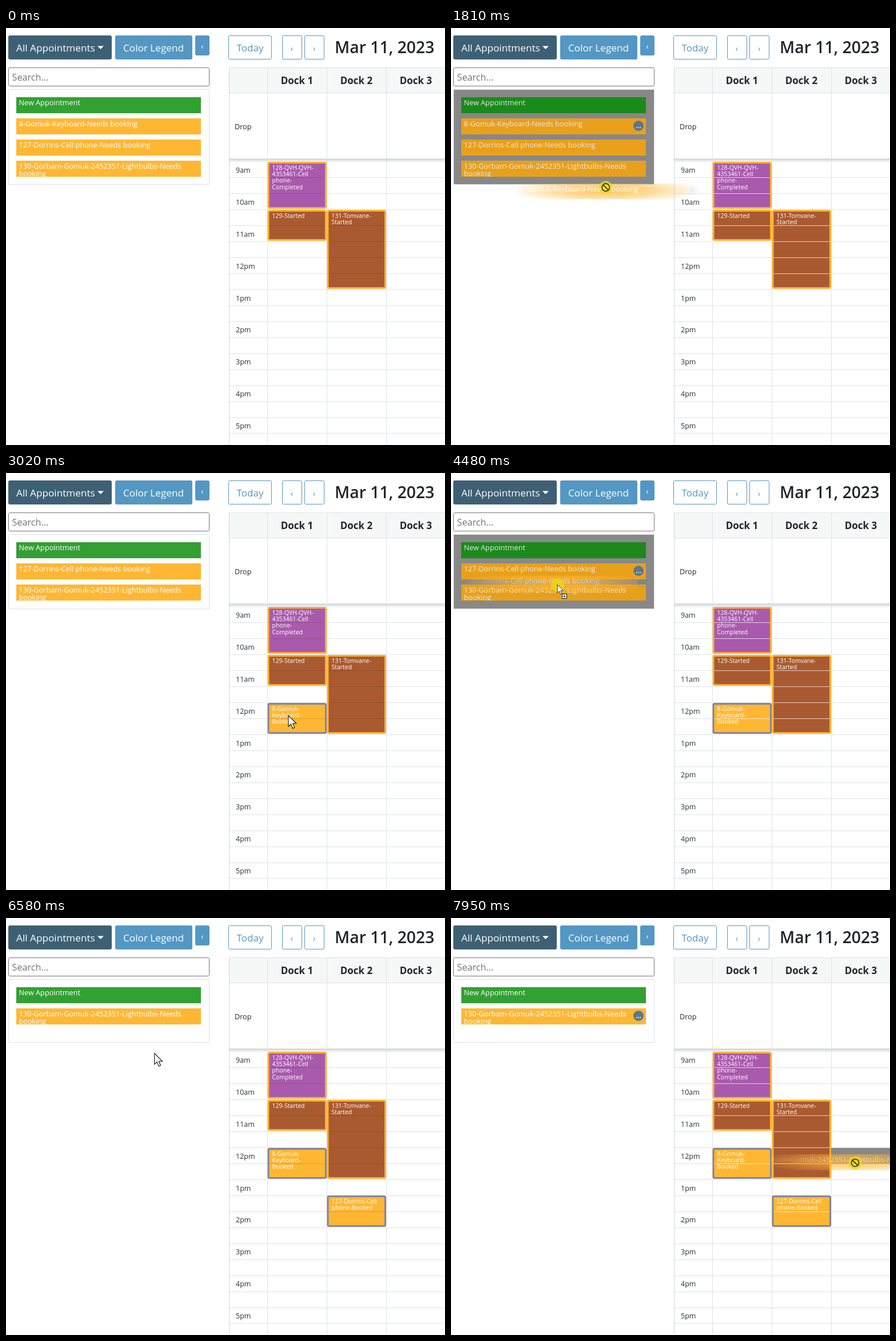
These frames come from a looping animation (768 px wide and 729 px high, 8000 ms). An HTML page with a canvas:

```html
<!DOCTYPE html>
<html lang="en">
<head>
<meta charset="utf-8">
<title>Dock schedule</title>
<style>
html, body { margin: 0; height: 100%; overflow: hidden; background: #fff; }
canvas { display: block; width: 100vw; height: 100vh; }
</style>
</head>
<body>
<canvas id="stage" width="768" height="729"></canvas>
<script>
const LOOP = 8000, COL = 104;
const BLUE = '#5497c3', ORANGE = '#ffb733', LINE = '#dee2e6', INK = '#212529';
const main = document.getElementById('stage').getContext('2d');
const layer = document.createElement('canvas');
layer.width = 768;
layer.height = 729;
const ghost = layer.getContext('2d');
let g = main;

// Pointer path: time, x, y
const path = [
  [300, 695, 701], [1070, 198, 194], [1270, 173, 169], [1510, 173, 169],
  [2200, 454, 440], [2470, 494, 424], [3390, 494, 424], [4160, 181, 176],
  [4210, 179, 174], [4400, 179, 174], [4480, 186, 195], [5090, 589, 514],
  [5410, 603, 508], [6110, 603, 508], [6580, 260, 237], [6880, 214, 173],
  [7000, 214, 173], [7450, 560, 478], [7700, 698, 448], [7950, 707, 428]
];

// Drag: pointer down, start, release, settled, grab point
const drags = [
  { down: 1440, start: 1520, drop: 2700, done: 2970, x: 173, y: 165 },
  { down: 4360, start: 4420, drop: 5560, done: 5560, x: 179, y: 174 },
  { down: 6930, start: 7010, drop: 9000, done: 9000, x: 214, y: 173 }
];

const items = [
  { lines: ['8-Gomuk-Keyboard-Needs booking'], until: 2970 },
  { lines: ['127-Dorrins-Cell phone-Needs booking'], until: 5560 },
  { lines: ['130-Gorbam-Gomuk-2452351-Lightbulbs-Needs', 'booking'], until: 9000 }
];

// Events span half-hour rows
const events = [
  { col: 0, row: 0, rows: 3, fill: '#a95aad', lines: ['128-QVH-QVH-', '4353461-Cell', 'phone-', 'Completed'] },
  { col: 0, row: 3, rows: 2, fill: '#aa5a30', lines: ['129-Started'] },
  { col: 1, row: 3, rows: 5, fill: '#aa5a30', lines: ['131-Tomvane-', 'Started'] },
  { col: 0, row: 6, rows: 2, fill: ORANGE, lines: ['8-Gomuk-', 'Keyboard-', 'Booked'], from: 2700, booked: 2970 },
  { col: 1, row: 9, rows: 2, fill: ORANGE, lines: ['127-Dorrins-Cell', 'phone-Booked'], from: 5560, booked: 5910 }
];

const rowTop = i => 234 + 27.94 * i;

function slope(i, k) {
  const a = path[i - 1], b = path[i], c = path[i + 1];
  if (!a || !c) return 0;
  const p = (b[k] - a[k]) / (b[0] - a[0]), q = (c[k] - b[k]) / (c[0] - b[0]);
  return p * q > 0 ? 2 * p * q / (p + q) : 0;
}

function pointer(t) {
  let i = 0;
  while (i < path.length - 2 && path[i + 1][0] <= t) i++;
  const a = path[i], b = path[i + 1], d = b[0] - a[0];
  const u = Math.max(0, Math.min(1, (t - a[0]) / d)), v = 1 - u;
  const at = k => a[k] * v * v * (1 + 2 * u) + b[k] * u * u * (3 - 2 * u)
    + d * u * v * (v * slope(i, k) - u * slope(i + 1, k));
  return { x: at(1), y: at(2) };
}

function rect(x, y, w, h, fill) {
  g.fillStyle = fill;
  g.fillRect(x, y, w, h);
}

function box(x, y, w, h, r, fill, stroke, width = 1) {
  g.beginPath();
  g.roundRect(x, y, w, h, r);
  if (fill) { g.fillStyle = fill; g.fill(); }
  if (stroke) { g.strokeStyle = stroke; g.lineWidth = width; g.stroke(); }
}

function text(s, x, y, size, color, weight = 400, align = 'left') {
  g.font = `${weight} ${size}px "Open Sans", "Noto Sans", sans-serif`;
  g.fillStyle = color;
  g.textAlign = align;
  g.fillText(s, x, y);
}

function disc(x, y, r, fill) {
  g.beginPath();
  g.arc(x, y, r, 0, 7);
  g.fillStyle = fill;
  g.fill();
}

function item(lines, x, y, fill, color, badge) {
  g.save();
  g.beginPath();
  g.rect(x, y, 323, 28);
  g.clip();
  rect(x, y, 323, 28, fill);
  lines.forEach((s, i) => text(s, x + 4.5, y + 14 + 13 * i, 12.7, color, 500));
  if (badge) {
    disc(x + 310, y + 13, 9, '#5f7786');
    for (let i = -1; i < 2; i++) disc(x + 310 + i * 3.2, y + 16, 1, color);
  }
  g.restore();
}

function toolbar() {
  box(4, 13, 181, 42, 3, '#3e6075');
  text('All Appointments', 18, 41, 17.2, '#fff');
  g.beginPath();
  g.moveTo(160, 31.5);
  g.lineTo(171, 31.5);
  g.lineTo(165.5, 37);
  g.fill();
  box(191, 13, 135, 42, 3, BLUE);
  text('Color Legend', 258, 41, 17.2, '#fff', 400, 'center');
  box(331, 13, 25, 35, 3, BLUE);
  text('‹', 343.5, 37, 14, '#fff', 400, 'center');
  box(389.5, 13.5, 75, 41, 2, '#fff', BLUE);
  text('Today', 427, 41, 17, BLUE, 400, 'center');
  box(483.5, 13.5, 34, 41, 2, '#fff', BLUE);
  text('‹', 500, 41, 15, BLUE, 400, 'center');
  box(522.5, 13.5, 34, 41, 2, '#fff', BLUE);
  text('›', 539, 41, 15, BLUE, 400, 'center');
  text('Mar 11, 2023', 575, 44, 28.4, INK, 600);
  box(4.5, 69.5, 351, 32, 2, '#fff', '#767676');
  text('Search...', 10.5, 92, 16.2, '#757575');
}

function list(t, p, held, dim) {
  const rows = items.filter(r => t < r.until);
  const height = Math.max(110, 56 + 36.8 * rows.length);
  const color = dim ? '#e8e8e8' : '#fff';
  box(4.5, 107.5, 351, Math.round(height), 0, dim ? '#888' : '#fff', LINE);
  item(['New Appointment'], 18, 121, dim ? '#1b8a1b' : '#33a033', color);
  rows.forEach((r, i) => {
    const y = Math.round(158 + 36.8 * i);
    const over = t >= 300 && p.x > 18 && p.x < 341 && p.y > y && p.y < y + 28;
    item(r.lines, 18, y, dim ? '#e8a01b' : ORANGE, color, held ? i === 0 : over);
  });
}

function calendar() {
  rect(390, 69, 378, 45, '#f6f8f8');
  rect(390, 69, 378, 1, LINE);
  rect(390, 113, 378, 1, LINE);
  rect(390, 228, 378, 4, '#dadedd');
  rect(390, 233, 378, 1, LINE);
  [1, 2, 3].forEach(n => text('Dock ' + n, 405 + COL * n, 98, 17, INK, 700, 'center'));
  text('Drop', 400, 177, 12.6, INK);
  for (let i = 1; i < 18; i++) rect(390, Math.floor(rowTop(i)), 378, 1, LINE);
  for (let i = 0; i < 9; i++) {
    const h = 9 + i;
    text((h > 12 ? h - 12 : h) + (h < 12 ? 'am' : 'pm'), 402, rowTop(2 * i) + 19, 12.5, '#2b2f33');
  }
  rect(390, 69, 1, 660, '#d3d7da');
  [457, 561, 665].forEach(x => rect(x, 69, 1, 660, LINE));
}

function event(e, t, held) {
  const x = 457.5 + COL * e.col, y = Math.round(rowTop(e.row));
  const h = Math.floor(rowTop(e.row + e.rows)) - 1 - y;
  const edge = t >= e.booked ? '#83849c' : '#ffb02c';
  box(x + 1.5, y + 1.5, 100.5, h - 3, 2, e.fill, edge, 3);
  for (let i = 1; i < e.rows; i++)
    rect(x + 3, Math.floor(rowTop(e.row + i)), 97.5, 1, held ? 'rgba(255,255,255,.7)' : 'rgba(60,40,30,.2)');
  e.lines.forEach((s, i) => text(s, x + 8, y + 14 + 11.2 * i, 10.5, '#fff', 500));
}

function slotAt(p) {
  if (p.x < 458 || p.y < rowTop(0)) return null;
  return { col: Math.floor((p.x - 457) / COL), row: Math.floor((p.y - rowTop(0)) / 27.94) };
}

// The carried item fades out around the pointer
function carry(lines, p, d) {
  const x = 18 + p.x - d.x, y = 158 + p.y - d.y;
  g = ghost;
  g.clearRect(0, 0, 768, 729);
  item(lines, x, y, ORANGE, '#fff', true);
  g.save();
  g.globalCompositeOperation = 'destination-in';
  g.translate(p.x, y + 12);
  g.scale(168, 23);
  const fade = g.createRadialGradient(0, 0, 0, 0, 0, 1);
  [[0, .8], [.5, .5], [.85, .16], [1, 0]].forEach(s => fade.addColorStop(s[0], `rgba(0,0,0,${s[1]})`));
  rect(-9, -99, 18, 198, fade);
  g.restore();
  g = main;
  g.drawImage(layer, 0, 0);
}

function arrow(p, scale) {
  const shape = [0, 0, 0, 19, 4.4, 15, 7.6, 22.4, 10.8, 21, 7.6, 13.8, 13.8, 13.8];
  g.save();
  g.translate(p.x, p.y);
  g.scale(scale, scale);
  g.beginPath();
  for (let i = 0; i < shape.length; i += 2) g.lineTo(shape[i], shape[i + 1]);
  g.closePath();
  g.fillStyle = '#fff';
  g.fill();
  g.strokeStyle = '#111';
  g.lineWidth = 1.1;
  g.stroke();
  g.restore();
}

function copyArrow(p) {
  arrow(p, .75);
  const x = Math.round(p.x) + 8.5, y = Math.round(p.y) + 16.5;
  box(x, y, 8, 8, 0, '#fff', '#111');
  rect(x + 2, y + 3.5, 4, 1, '#111');
  rect(x + 3.5, y + 2, 1, 4, '#111');
}

function noDrop(p) {
  g.beginPath();
  g.arc(p.x, p.y, 6.6, 0, 7);
  g.moveTo(p.x - 4.6, p.y - 4.6);
  g.lineTo(p.x + 4.6, p.y + 4.6);
  g.strokeStyle = '#2a2a12';
  g.lineWidth = 1.5;
  g.stroke();
}

function draw(t) {
  const p = pointer(t);
  const press = drags.find(d => t >= d.down && t < d.drop);
  const held = drags.find(d => t >= d.start && t < d.done);
  const drag = held && t < held.drop;
  const slot = drag && slotAt(p);

  rect(0, 0, 768, 729, '#fff');
  toolbar();
  list(t, p, held, drag && p.x < 458);
  calendar();
  if (slot) rect(457 + COL * slot.col, Math.round(rowTop(slot.row)), COL, 28, '#888');
  events.forEach(e => { if (t >= (e.from || 0)) event(e, t, held); });
  if (drag) carry(items[drags.indexOf(held)].lines, p, held);
  if (press) disc(p.x, p.y, 11.5, 'rgba(234,218,20,.75)');
  if (t < 300) return;
  const onList = p.x < 356 && p.y < 274;
  if (!drag) arrow(p, 1);
  else if (!slot && !onList || t >= 7900) noDrop(p);
  else copyArrow(p);
}

function frame() {
  draw(performance.now() % LOOP);
  requestAnimationFrame(frame);
}
frame();
</script>
</body>
</html>
```
